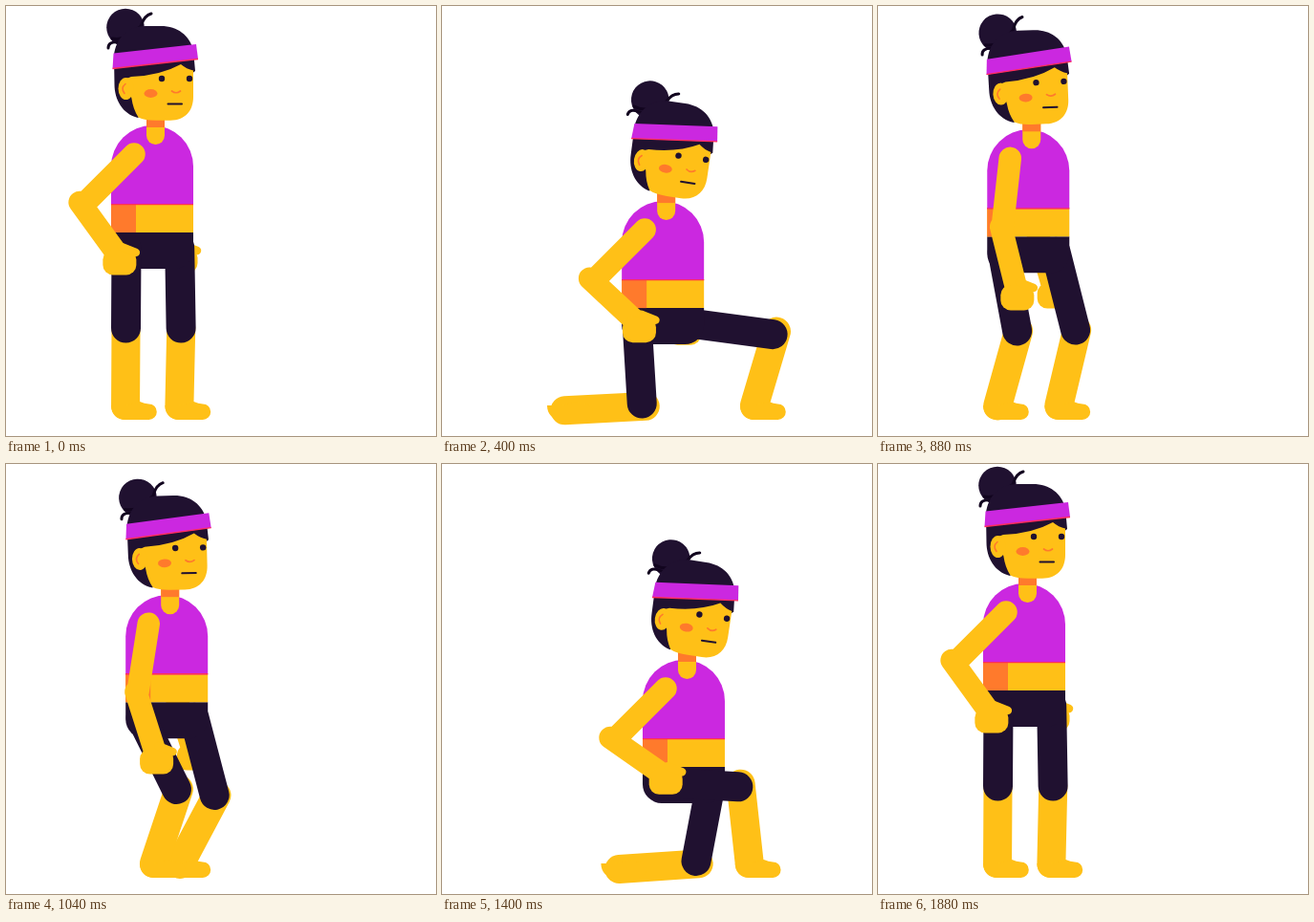
Recreate the animation shown at these times as an HTML page. Size 450 by 450 pixels, loop 1.92 s.

```html
<!DOCTYPE html>
<html lang="en">
<head>
<meta charset="utf-8">
<title>Lunges</title>
<style>
  html, body { margin: 0; width: 100%; height: 100%; overflow: hidden; background: #fff; }
  svg { display: block; width: 100vw; height: 100vh; }
  .skin { fill: #ffc017; }
  .dark { fill: #201130; }
  .top { fill: #cb28e0; }
  .blush { fill: #ff7a2c; }
  .limb { fill: none; stroke: #ffc017; stroke-linecap: round; }
  .thigh { fill: none; stroke: #201130; stroke-width: 31; stroke-linecap: round; }
  .shin { stroke-width: 30; }
  .arm { stroke-width: 23.5; }
  .line { fill: none; stroke-linecap: round; }
  .seam { fill: none; stroke: #ff2d5c; stroke-width: 1.3; }
  .strand { stroke: #12051f; stroke-width: 3; }
</style>
</head>
<body>
<svg viewBox="0 0 450 450">
  <defs>
    <g id="hand">
      <rect class="skin" x="-17.5" y="-8" width="35" height="26.5" rx="10.5"/>
      <path class="limb" stroke-width="8.5" d="M2 -11L17 -5"/>
    </g>
    <path id="foot" class="skin" d="M0 418C0 427 6 433 15 433H39.5A8.3 8.3 0 0 0 39.5 416.4Q35 416.4 30 414L15 418Z"/>
  </defs>

  <g id="farArm"><path class="limb arm"/><use href="#hand"/></g>
  <g id="farLeg"><path class="limb shin"/><use href="#foot"/><path class="thigh"/></g>
  <path id="pelvis" class="dark" d="M110 237H196V255A20 20 0 0 1 176 275H130A20 20 0 0 1 110 255Z"/>
  <g id="nearLeg"><path class="limb shin"/><use href="#foot"/><path class="thigh"/></g>

  <g id="body">
    <path class="skin" d="M110 207H196V237H110Z"/>
    <path class="blush" d="M110 207H136V237H110Z"/>
    <path class="top" d="M110 208V168A43 43 0 0 1 196 168V208Z"/>
    <path class="seam" d="M110 207.6H196"/>
    <path class="skin" d="M147 115H166V135.5A9.5 9.5 0 0 1 147 135.5Z"/>
    <path class="blush" d="M147 115H166V127H147Z"/>

    <g id="head">
      <g id="bun">
        <circle class="dark" cx="125" cy="22.5" r="19.8"/>
        <path class="line strand" d="M107 44Q107 37 117 38C132 39 139 29 142 19Q145 10 152 8"/>
        <path class="line strand" d="M111 34Q126 37 140 22"/>
      </g>
      <path class="dark" d="M113 52C115 33 128 21 146 21H162C180 21 192 31 196 46L198 68L183 80L138 117C122 113 113.500 98 113.500 82Z"/>
      <path class="skin" d="M131 74Q161 73 183 61Q189 66 196 67.500V95C196 110 187 119.700 172 119.700H157Q145 119.700 138.500 116.500Q133 108 131.500 97L126 76Z"/>
      <ellipse class="skin" cx="125.500" cy="86.500" rx="8" ry="11.500"/>
      <path class="line" stroke="#ff7a2c" stroke-width="1.6" d="M125 81.500Q119.500 86 124 91.500"/>
      <path class="top" d="M112.500 49.500L199 40L201 55.500L111.500 65.500Z"/>
      <path class="seam" d="M111.500 65.500L201 55.500"/>
      <ellipse class="blush" cx="151.500" cy="91.500" rx="7" ry="4.400"/>
      <circle class="dark" cx="163" cy="76" r="3.200"/>
      <circle class="dark" cx="192" cy="76" r="3.200"/>
      <path class="line" stroke="#ff7a2c" stroke-width="1.700" d="M173.500 89Q178 92.500 182.500 89"/>
      <path class="line" stroke="#201130" stroke-width="2" stroke-linecap="butt" d="M169.500 102.500H184"/>
    </g>
  </g>

  <g id="nearArm"><path class="limb arm"/><use href="#hand"/></g>
</svg>
<script>
const LOOP = 1920, STEP = 40;
const THIGH = 84, SHIN = 81.05, UPPER = 72, FOREARM = 71;
const DEEP = 80, REST = 3.8;

const byId = id => document.getElementById(id);
const mix = (a, b, k) => a + (b - a) * k;
const clamp01 = v => Math.min(1, Math.max(0, v));
const span = (t, a, b) => clamp01((t - a) / (b - a));
const ease = (t, a, b) => (1 - Math.cos(Math.PI * span(t, a, b))) / 2;
const easeIn = s => 2 * s * s - s * s * s;
const line = (a, b) => `M${a[0].toFixed(2)} ${a[1].toFixed(2)}L${b[0].toFixed(2)} ${b[1].toFixed(2)}`;
const move = (x, y) => `translate(${x.toFixed(2)} ${y.toFixed(2)})`;
const turn = (id, deg, x, y) => byId(id).setAttribute('transform', `rotate(${deg.toFixed(2)} ${x} ${y})`);

// how far the hips have sunk
function depthAt(t) {
  if (t < 433) return DEEP * (1 - easeIn(1 - t / 433));
  if (t < 920) return mix(DEEP, REST, ease(t, 433, 905));
  if (t < 1405) return mix(REST, DEEP, ease(t, 940, 1405));
  const s = span(t, 1405, 1880);
  return DEEP * (1 - mix(easeIn(s), s, 0.25));
}

// the knee follows from the hip and the planted foot
function drawLeg(id, hip, footX, nudge) {
  const [shin, foot, thigh] = byId(id).children;
  const trail = clamp01((hip[0] - footX - 15) / 90);
  const ankle = [footX + 15 + 4 * trail, 418 + 6 * trail];
  const dx = ankle[0] - hip[0], dy = ankle[1] - hip[1], d = Math.hypot(dx, dy);
  const along = (THIGH ** 2 - SHIN ** 2 + d * d) / (2 * d);
  const out = Math.sqrt(Math.max(0, THIGH ** 2 - along ** 2));
  const ux = dx / d, uy = dy / d;
  const knee = [hip[0] + ux * along + uy * out + nudge, hip[1] + uy * along - ux * out + 2 * nudge];
  const cap = [knee[0] + uy * out * 0.08, knee[1] - ux * out * 0.08];
  shin.setAttribute('d', line(cap, ankle));
  foot.setAttribute('transform', move(footX, 0));
  thigh.setAttribute('d', line(hip, knee));
}

function drawArm(id, path, wrist) {
  const [arm, hand] = byId(id).children;
  arm.setAttribute('d', path);
  hand.setAttribute('transform', move(...wrist));
}

function drawNearArm(shoulder, upperDeg, lowerDeg) {
  const a = upperDeg * Math.PI / 180, b = lowerDeg * Math.PI / 180;
  const u = [-Math.sin(a), Math.cos(a)], v = [Math.sin(b), Math.cos(b)];
  const elbow = shoulder.map((c, i) => c + UPPER * u[i]);
  const cap = elbow.map((c, i) => c + 4.6 * (u[i] - v[i]));
  const wrist = cap.map((c, i) => c + FOREARM * v[i]);
  drawArm('nearArm', line(shoulder, elbow) + line(cap, wrist), wrist);
}

function draw(t) {
  const depth = depthAt(t), p = depth / DEEP;
  const swap = ease(t, 880, 960);                          // far leg leads, then near leg
  const hang = ease(t, 660, 920) - ease(t, 950, 1350);     // arms drop between lunges
  const x = 110 + depth * mix(0.988, 1.25, swap), y = 237 + depth;

  for (const id of ['pelvis', 'body']) byId(id).setAttribute('transform', move(x - 110, depth));
  const nod = 8.5 * p - 3 * hang;
  turn('head', nod, 156, 120);
  turn('bun', nod, 125, 22.5);

  drawLeg('farLeg', [x + 71.7, y + 16], 166.4 + 1.84 * depth * (1 - swap), 2.5 * p * (1 - swap));
  drawLeg('nearLeg', [x + 16, y + 16], 110 + 2.46 * depth * swap, 0);

  drawNearArm([x + 24, y - 82], 45 - 41 * hang, 36 + mix(11, 19, swap) * p - 24 * hang);
  const farWrist = [x + 73 + 14 * p - 22 * p * p - 4 * hang, y + 24 - mix(4, 13, swap) * p + 35 * hang];
  drawArm('farArm', line([x + 45, y - 30], farWrist), farWrist);
}

const start = performance.now();
function tick() {
  const t = (performance.now() - start) % LOOP;
  draw(Math.floor(t / STEP) * STEP);
  requestAnimationFrame(tick);
}
tick();
</script>
</body>
</html>
```
